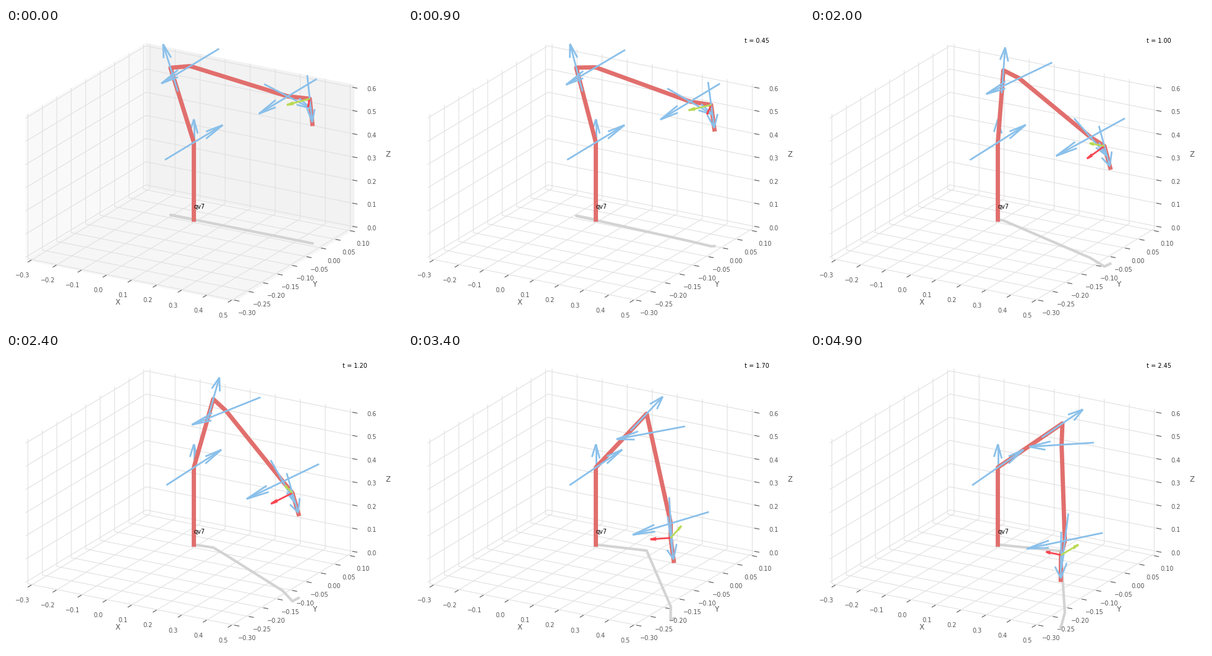
Recreate the animation shown at these times as a matplotlib script. Size 640 by 480 pixels, loop 5 s.

```python
import numpy as np
import matplotlib.pyplot as plt
from matplotlib.animation import FuncAnimation
from matplotlib.collections import LineCollection
from matplotlib.patches import Polygon

plt.rcParams["font.family"] = "DejaVu Sans"
plt.rcParams["font.size"] = 7

FRAMES, INTERVAL, DT = 50, 100, 0.05
GREY, GRID = "#555555", "#e0e0e0"
PANES = ("#f9f9f9", "#f2f2f2", "#f6f6f6")
ARM, SHADOW, AXIS = "#E16F6D", "lightgrey", "#8AC0EA"
EE_COLORS = ("#F84752", "#BADA55")

# Modified DH table of the seven-joint arm
ALPHA = np.pi / 2 * np.array([0, -1, 1, 1, -1, 1, 1])
A = [0, 0, 0, 0.0825, -0.0825, 0, 0.088]
D = [0.333, 0, 0.316, 0, 0.384, 0, 0]
FLANGE = 0.107
Q_START = np.array([0, -0.3, 0, -2.2, 0, 2.0, np.pi / 4])
Q_END = np.array([0.1197, 0.807, -0.682, -1.693, 0.627, 2.268, 2.322])

# Orthographic view of the unit cube, elevation 30, azimuth -60 degrees,
# stretched to an axes box 1.08 stage widths wide
LOW, HIGH = np.array([-0.3, -0.3, 0]), np.array([0.5, 0.1, 0.6])
ELEV, AZIM = np.radians(30), np.radians(-60)
CENTRE = np.array([-57.6 + 691.2 * 0.95 / 1.85, 480 - 480 * 0.95 / 1.85])
SCALE = np.array([691.2, -480]) / 1.85
VIEW = np.array([[-np.sin(AZIM), -np.sin(ELEV) * np.cos(AZIM)],
                 [np.cos(AZIM), -np.sin(ELEV) * np.sin(AZIM)],
                 [0, np.cos(ELEV)]]) * SCALE
(X0, Y0, Z0), (X1, Y1, Z1) = LOW - (HIGH - LOW) / 48, HIGH + (HIGH - LOW) / 48


def project(points):
    unit = (np.asarray(points, float) - LOW) / (HIGH - LOW) - 0.5
    return CENTRE + unit @ VIEW


def link(alpha, a, d, q):
    ca, sa, c, s = np.cos(alpha), np.sin(alpha), np.cos(q), np.sin(q)
    return np.array([[c, -s, 0, a],
                     [s * ca, c * ca, -sa, -d * sa],
                     [s * sa, c * sa, ca, d * ca],
                     [0, 0, 0, 1]])


def joint_frames(q):
    pose, poses = np.eye(4), []
    for row in zip(ALPHA, A, D, q):
        pose = pose @ link(*row)
        poses.append(pose)
    return poses


def arrow(start, vector, ratio=0.3, angle=np.radians(15)):
    """Shaft and two barbs, the barbs turned about a horizontal normal."""
    tip = start + vector
    flat = np.hypot(vector[0], vector[1])
    if flat > 1e-9:
        normal = np.array([vector[1], -vector[0], 0]) / flat
    else:
        normal = np.array([0.0, 1.0, 0.0])
    side = np.cross(normal, vector) * np.sin(angle)
    back = vector * np.cos(angle)
    return [project([start, tip]),
            project([tip, tip - ratio * (back + side)]),
            project([tip, tip - ratio * (back - side)])]


fig = plt.figure(figsize=(6.4, 4.8), dpi=100, facecolor="white")
ax = fig.add_axes([0, 0, 1, 1])
ax.set(xlim=(0, 640), ylim=(480, 0))
ax.axis("off")


def label(x, y, text, **kw):
    style = dict(color=GREY, ha="center", va="center") | kw
    return ax.text(x, y, text, **style)


def lines(segments, color, width, zorder):
    group = LineCollection(segments, colors=color, linewidths=width, zorder=zorder)
    ax.add_collection(group)
    return group


def number(value, digits):
    return f"{value:.{digits}f}".replace("-", "\u2212")


# Walls and floor
corners = ([(X0, Y0, Z0), (X0, Y1, Z0), (X0, Y1, Z1), (X0, Y0, Z1)],
           [(X0, Y1, Z0), (X1, Y1, Z0), (X1, Y1, Z1), (X0, Y1, Z1)],
           [(X0, Y0, Z0), (X1, Y0, Z0), (X1, Y1, Z0), (X0, Y1, Z0)])
panes = [ax.add_patch(Polygon(project(c), facecolor=color, edgecolor="none", zorder=0))
         for c, color in zip(corners, PANES)]

# Grid, ticks and tick labels
grid, ticks = [], []
for i in range(9):
    x, y = (i - 3) / 10, (i - 6) / 20
    grid.append(project([(x, Y0, Z0), (x, Y1, Z0), (x, Y1, Z1)]))
    grid.append(project([(X1, y, Z0), (X0, y, Z0), (X0, y, Z1)]))
    ticks.append(project([(x, Y0 - 0.007, Z0), (x, Y0 + 0.006, Z0)]))
    ticks.append(project([(X1 - 0.0083, y, Z0), (X1 + 0.0117, y, Z0)]))
    label(27 + 40.5 * i, 399.9 + 8.1 * i, number(x, 1))
    label(390 + 23.4 * i, 461 - 14 * i, number(y, 2))
for i in range(7):
    z = i / 10
    grid.append(project([(X0, Y0, z), (X0, Y1, z), (X1, Y1, z)]))
    ticks.append(project([(X1 - 0.0083, Y1, z), (X1 + 0.0117, Y1, z)]))
    label(591.5, 323.9 - 37.5 * i, number(z, 1))
lines(grid, GRID, 0.8, 1)
lines(ticks, GREY, 0.8, 1.5)
for x, y, name in ((181, 443.7, "X"), (499.5, 414.5, "Y"), (617, 204, "Z")):
    label(x, y, name, fontsize=8.4)

# Moving parts
shadow, = ax.plot([], [], color=SHADOW, lw=3, zorder=2)
arm, = ax.plot([], [], color=ARM, lw=5, zorder=3)
base_axis = lines([], AXIS, 2, 2.5)
joint_axes = lines([], AXIS, 2, 4)
ee_axes = [lines([], color, 2, 5) for color in EE_COLORS]
label(304, 291.5, "qv7", color="black", ha="left", va="baseline", zorder=6)
clock = label(544, 24, "", color="black", ha="left", va="baseline")


def update(i):
    u = i / (FRAMES - 1)
    s = u**3 * (10 - 15 * u + 6 * u * u)
    poses = joint_frames(Q_START + s * (Q_END - Q_START))
    last = poses[-1]

    points = [np.zeros(3)] + [p[:3, 3] for p in poses]
    points.append(last[:3, 3] + FLANGE * last[:3, 2])
    points = np.array(points)
    arm.set_data(*project(points).T)
    shadow.set_data(*project(points * (1, 1, 0)).T)

    arrows = [arrow(p[:3, 3] - 0.1 * p[:3, 2], 0.2 * p[:3, 2]) for p in poses]
    base_axis.set_segments(arrows[0])
    joint_axes.set_segments(sum(arrows[1:], []))
    for k, group in enumerate(ee_axes):
        group.set_segments(arrow(last[:3, 3], 0.06 * last[:3, k]))

    for pane in panes:
        pane.set_visible(i == 0)
    clock.set_text(f"t = {i * DT:.2f}" if i else "")
    return [arm, shadow, base_axis, joint_axes, *ee_axes, *panes, clock]


anim = FuncAnimation(fig, update, frames=FRAMES, interval=INTERVAL,
                     repeat=True, repeat_delay=0, blit=False)
plt.show()
```
